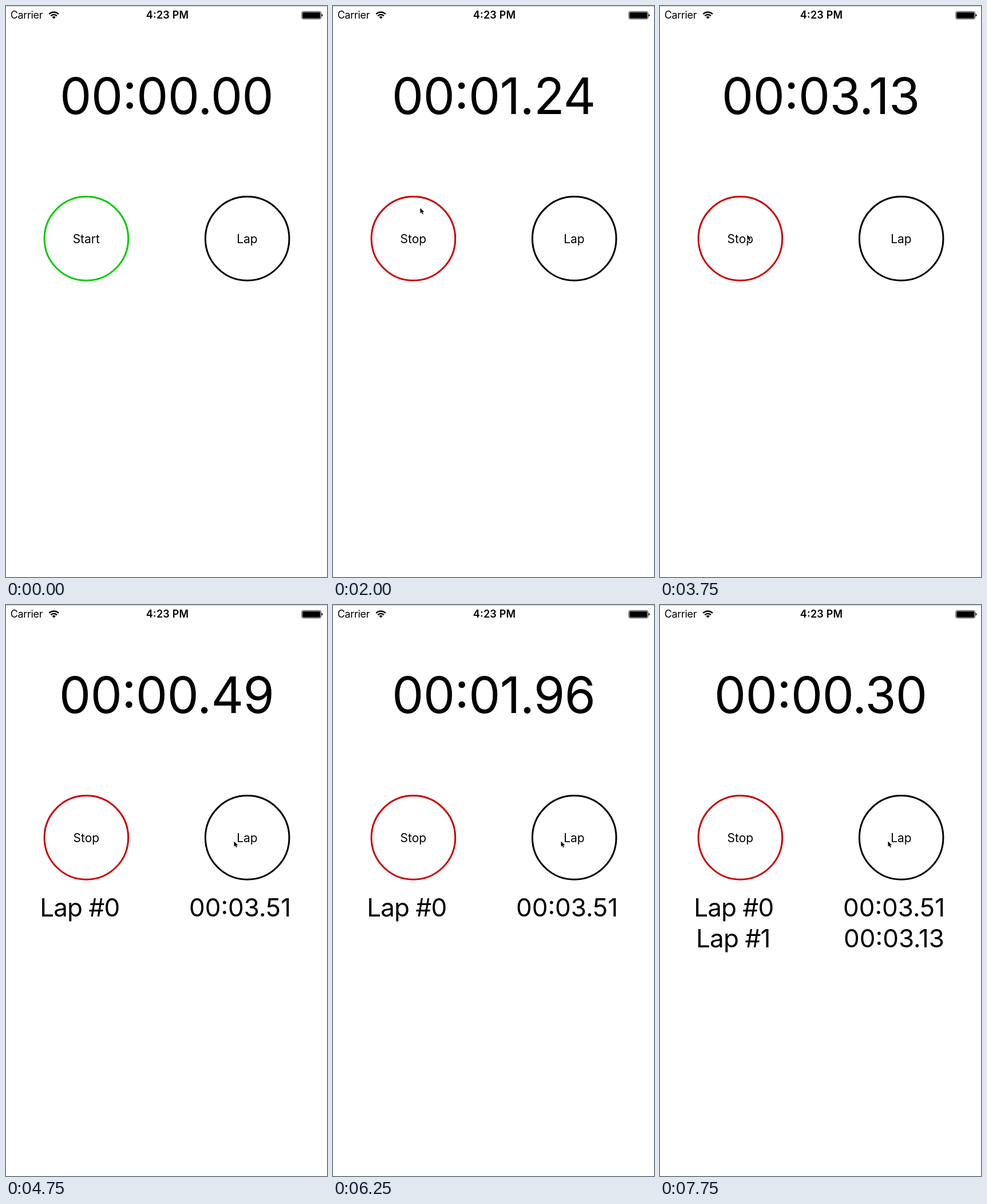
Write an HTML page that moves like this. It is 561 px wide and 999 px high and loops after 8000 ms.

```html
<!DOCTYPE html>
<html lang="en">
<head>
<meta charset="utf-8">
<title>Stopwatch</title>
<style>
  html, body { margin: 0; width: 100%; height: 100%; overflow: hidden; background: #fff; }
  svg { display: block; font: 21px Inter, sans-serif; font-feature-settings: "calt" 1; }
  .mid { text-anchor: middle; }
  .ring { fill: none; stroke: #000; stroke-width: 3; }
  .row { font-size: 44px; text-anchor: middle; }
  .status { font-size: 18px; }
  .tight { letter-spacing: -.02em; }
  #clock { font-size: 88px; letter-spacing: -.009em; }
</style>
</head>
<body>
<svg width="561" height="999" viewBox="0 0 561 999">
  <path d="M0 .5H561" stroke="#c4c4c6"/>
  <text class="status tight" x="7.8" y="22.3">Carrier</text>
  <g fill="none" stroke="#000" stroke-width="2.4">
    <path d="M75.3 14.2A11.6 11.6 0 0 1 91.9 14.2"/>
    <path d="M78.3 17.3A7.4 7.4 0 0 1 88.9 17.3"/>
  </g>
  <path d="M83.6 22.6L80.6 19.5A4.3 4.3 0 0 1 86.6 19.5Z"/>
  <text class="status mid" x="282.1" y="22.3" font-weight="600" letter-spacing=".2">4:23 PM</text>
  <rect x="517" y="9.7" width="33.5" height="13" rx="2.6" fill="none" stroke="#000" stroke-width=".9"/>
  <rect x="518.3" y="11" width="30.9" height="10.4" rx="1.5"/>
  <path d="M551.7 13.8Q553.6 14.5 553.6 16.2T551.7 18.6Z"/>

  <text id="clock" class="mid" x="280.6" y="189"></text>

  <circle id="toggleRing" class="ring" cx="140.4" cy="406.9" r="73.3"/>
  <text id="toggle" class="mid" x="140.3" y="414.7"></text>
  <circle class="ring" cx="421.7" cy="406.9" r="73.3"/>
  <text class="mid" x="421.4" y="414.7">Lap</text>

  <g id="lap0" class="row">
    <text class="tight" x="128.8" y="545">Lap #0</text><text x="409" y="545">00:03.51</text>
  </g>
  <g id="lap1" class="row">
    <text class="tight" x="127.8" y="599">Lap #1</text><text x="409" y="599">00:03.13</text>
  </g>

  <g id="cursor">
    <path d="M.5 .5V9.8L2.7 7.8L4.2 11.2L5.8 10.6L4.3 7.2H7.3Z" transform="translate(.5 2)"
      opacity=".18"/>
    <path d="M.5 .5V9.8L2.7 7.8L4.2 11.2L5.8 10.6L4.3 7.2H7.3Z"
      stroke="#fff" stroke-width="1.8" paint-order="stroke"/>
  </g>
</svg>
<script>
const LOOP = 8000, STEP = 250;
const START = 760, LAP0 = 4250, LAP1 = 7444;
const $ = id => document.getElementById(id);

// Keys are [time, ...values]; values are interpolated linearly.
const elapsedKeys = [[START, 0], [1000, .24], [2000, 1.24], [3750, 3.13], [LAP0, 3.62]];
const cursorKeys = [[1250, 145, 342], [1500, 152, 353], [3250, 152, 353], [3750, 152, 400], [LAP0, 398, 413]];

function sample(keys, t) {
  const next = keys.findIndex(key => key[0] > t);
  if (next === 0) return keys[0].slice(1);
  if (next < 0) return keys[keys.length - 1].slice(1);
  const a = keys[next - 1], b = keys[next], k = (t - a[0]) / (b[0] - a[0]);
  return a.slice(1).map((v, i) => v + (b[i + 1] - v) * k);
}

function elapsed(t) {
  if (t < LAP0) return sample(elapsedKeys, t)[0];
  return (t - (t < LAP1 ? LAP0 : LAP1)) * .00098;
}

function format(seconds) {
  const total = Math.round(seconds * 100), pad = n => String(n).padStart(2, "0");
  return `${pad(Math.floor(total / 6000))}:${pad(Math.floor(total / 100) % 60)}.${pad(total % 100)}`;
}

const show = (id, on) => $(id).setAttribute("visibility", on ? "visible" : "hidden");

function draw(t) {
  const running = t >= START;
  $("clock").textContent = format(elapsed(t));
  $("toggle").textContent = running ? "Stop" : "Start";
  $("toggleRing").style.stroke = running ? "#c00" : "#0c0";
  show("lap0", t >= LAP0);
  show("lap1", t >= LAP1);
  show("cursor", t >= 500);
  $("cursor").setAttribute("transform", `translate(${sample(cursorKeys, t)})`);
}

const origin = performance.now();
function frame() {
  const t = (performance.now() - origin) % LOOP;
  draw(Math.floor(t / STEP) * STEP);
  requestAnimationFrame(frame);
}
frame();
</script>
</body>
</html>
```
